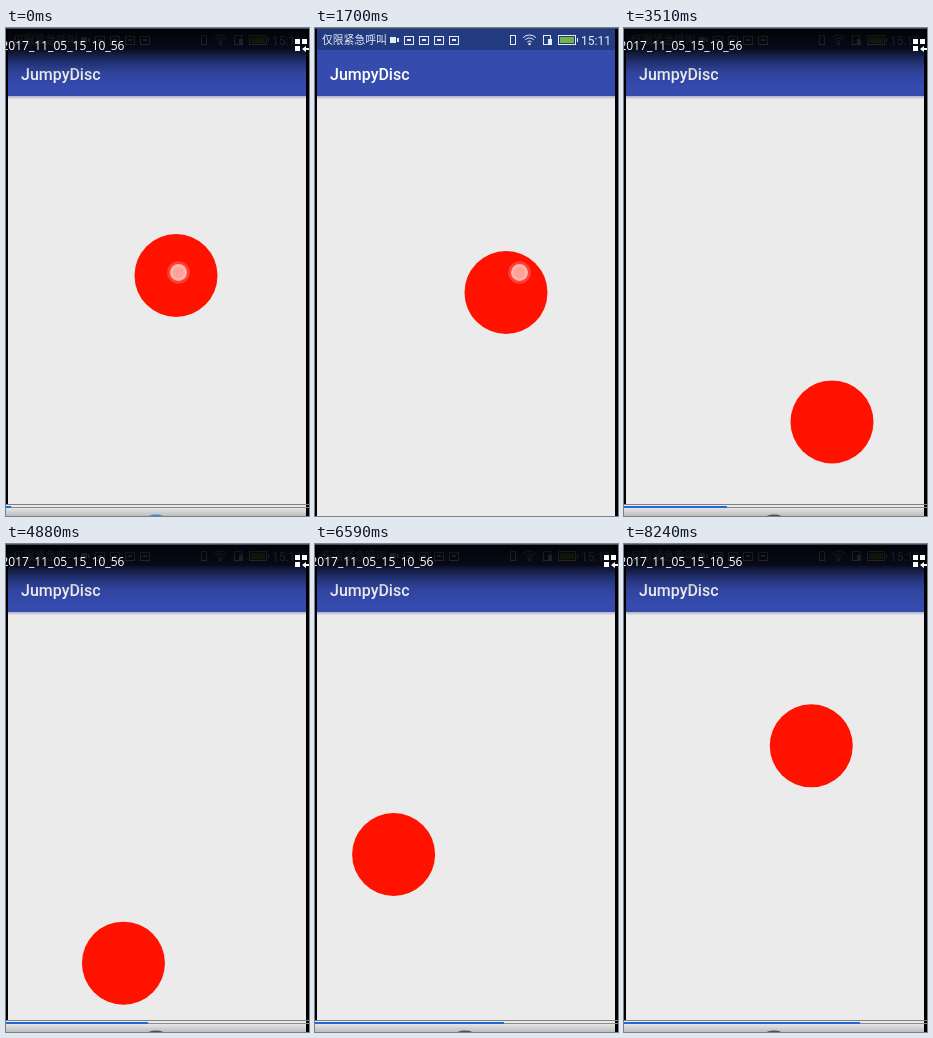
Write an HTML page with a canvas that moves like this. It is 303 px wide and 488 px high and loops after 8.34 s.

```html
<!DOCTYPE html>
<html lang="en">
<head>
<meta charset="utf-8">
<title>Bouncing ball</title>
<style>
html, body { margin: 0; width: 100%; height: 100%; overflow: hidden; background: #000; }
canvas { display: block; }
</style>
</head>
<body>
<canvas id="stage" width="303" height="488"></canvas>
<script>
const ctx = document.getElementById('stage').getContext('2d');
const LOOP = 8340, STEP = 139.3, START = 3;
const RADIUS = 41.5, SPEED = 65, RELEASE = 3.07;
const INK = '#e6eaf5';

// While held, the ball trails the finger between these poses
const poses = [
  { t: 0, ball: [170, 247.5], finger: [172.5, 244.5] },
  { t: 1.675, ball: [191, 264.5], finger: [204.5, 244.5] },
  { t: 2.65, ball: [189.5, 227], finger: [207, 212] },
  { t: RELEASE, ball: [235, 367], finger: [235, 369] }
];

const clamp = v => Math.max(0, Math.min(1, v));
const smooth = u => u * u * (3 - 2 * u);

const snap = ms => (START + STEP * Math.max(0, Math.floor((ms - START) / STEP))) / 1000;

function heldAt(t, part) {
  const next = poses.findIndex(p => p.t > t);
  const a = poses[next - 1], b = poses[next];
  const u = smooth((t - a.t) / (b.t - a.t));
  return a[part].map((v, k) => v + (b[part][k] - v) * u);
}

// Constant diagonal speed, bouncing off the floor and then the left wall
const bounceAt = t => [
  43.7 + Math.abs(SPEED * (t - 6.013)),
  451.8 - Math.abs(SPEED * (t - 4.376))
];

function rect(x, y, w, h, color) {
  ctx.fillStyle = color;
  ctx.fillRect(x, y, w, h);
}

function frameBox(x, y, w, h) {
  ctx.strokeStyle = INK;
  ctx.lineWidth = 1;
  ctx.strokeRect(x + .5, y + .5, w, h);
}

function disc([x, y], r, color) {
  ctx.fillStyle = color;
  ctx.beginPath();
  ctx.arc(x, y, r, 0, Math.PI * 2);
  ctx.fill();
}

function text(str, x, y, font, color) {
  ctx.font = font;
  ctx.fillStyle = color;
  ctx.fillText(str, x, y);
}

function shade(y, w, h, ...stops) {
  const g = ctx.createLinearGradient(0, y, 0, y + h);
  stops.forEach(([at, color]) => g.addColorStop(at, color));
  rect(0, y, w, h, g);
}

function wifi(x, y) {
  disc([x, y], 1.2, INK);
  ctx.strokeStyle = INK;
  for (let r = 3; r < 10; r += 3) {
    ctx.beginPath();
    ctx.arc(x, y, r, -Math.PI * .75, -Math.PI * .25);
    ctx.stroke();
  }
}

function statusBar() {
  rect(2, 1, 298, 21, '#233c81');
  text('仅限紧急呼叫', 7, 16, '10.8px "Noto Sans CJK SC", "Noto Sans CJK", sans-serif', INK);
  rect(75, 9, 6, 6, INK);
  rect(82, 10, 2, 4, INK);
  for (let i = 0; i < 4; i++) {
    const x = 89 + 15 * i;
    frameBox(x, 8, 9, 8);
    rect(x + 3, 11, 4, 2, INK);
  }
  frameBox(195, 7, 5, 9);
  wifi(214.5, 16);
  frameBox(228, 7, 7, 9);
  rect(233, 11, 4, 6, INK);
  frameBox(243, 7, 17, 9);
  rect(245, 9, 14, 6, '#72b545');
  rect(262, 10, 1, 4, INK);
  text('15:11', 266, 16.5, '12px Roboto, sans-serif', INK);
}

function app(t) {
  rect(0, 0, 303, 488, '#000');
  rect(2, 1, 298, 487, '#ebebeb');
  statusBar();
  rect(2, 22, 298, 46, '#354bae');
  shade(68, 300, 3, [0, '#a9aecb'], [1, '#e6e6e8']);
  rect(0, 68, 2, 3, '#000');
  text('JumpyDisc', 15, 52, '500 16px Roboto, sans-serif', '#fff');

  const held = t < RELEASE;
  disc(held ? heldAt(t, 'ball') : bounceAt(t), RADIUS, '#ff1200');
  if (held) {
    const finger = heldAt(t, 'finger');
    disc(finger, 11.3, 'rgba(255,150,140,.35)');
    disc(finger, 8.5, '#ffb4ac');
    disc(finger, 5.5, '#ffa198');
  }
}

function player(t) {
  ctx.globalAlpha = clamp(Math.abs(t - 1.75) / .3 - 1.5);
  shade(0, 303, 60, [0, 'rgba(0,0,0,.95)'], [.35, 'rgba(0,0,0,.82)'],
    [.55, 'rgba(0,0,0,.38)'], [.75, 'rgba(0,0,0,.1)'], [1, 'rgba(0,0,0,0)']);
  text('2017_11_05_15_10_56', -4.5, 22, '500 12px "Open Sans", sans-serif', '#fff');
  for (const [x, y] of [[289, 11], [296, 11], [289, 18]]) rect(x, y, 5, 5, '#fff');
  ctx.fill(new Path2D('M296 21L300 18V20H303V22H300V24Z'));

  shade(476, 300, 12, [0, '#f0f0f0'], [.4, '#e2e2e2'], [1, '#bcbcbc']);
  rect(0, 476, 303, 1, '#808080');
  rect(0, 479, 303, 1, '#8c8c8c');
  rect(0, 478, 5 + 28.1 * t, 2, '#1f6ad6');
  disc([150, 506], 19.5, t < 1 ? '#2a93d5' : '#505050');
  ctx.globalAlpha = 1;
}

function frame(now) {
  const t = snap(now % LOOP);
  app(t);
  player(t);
  rect(0, 0, 303, 1, '#3c4f5c');
  requestAnimationFrame(frame);
}
requestAnimationFrame(frame);
</script>
</body>
</html>
```
